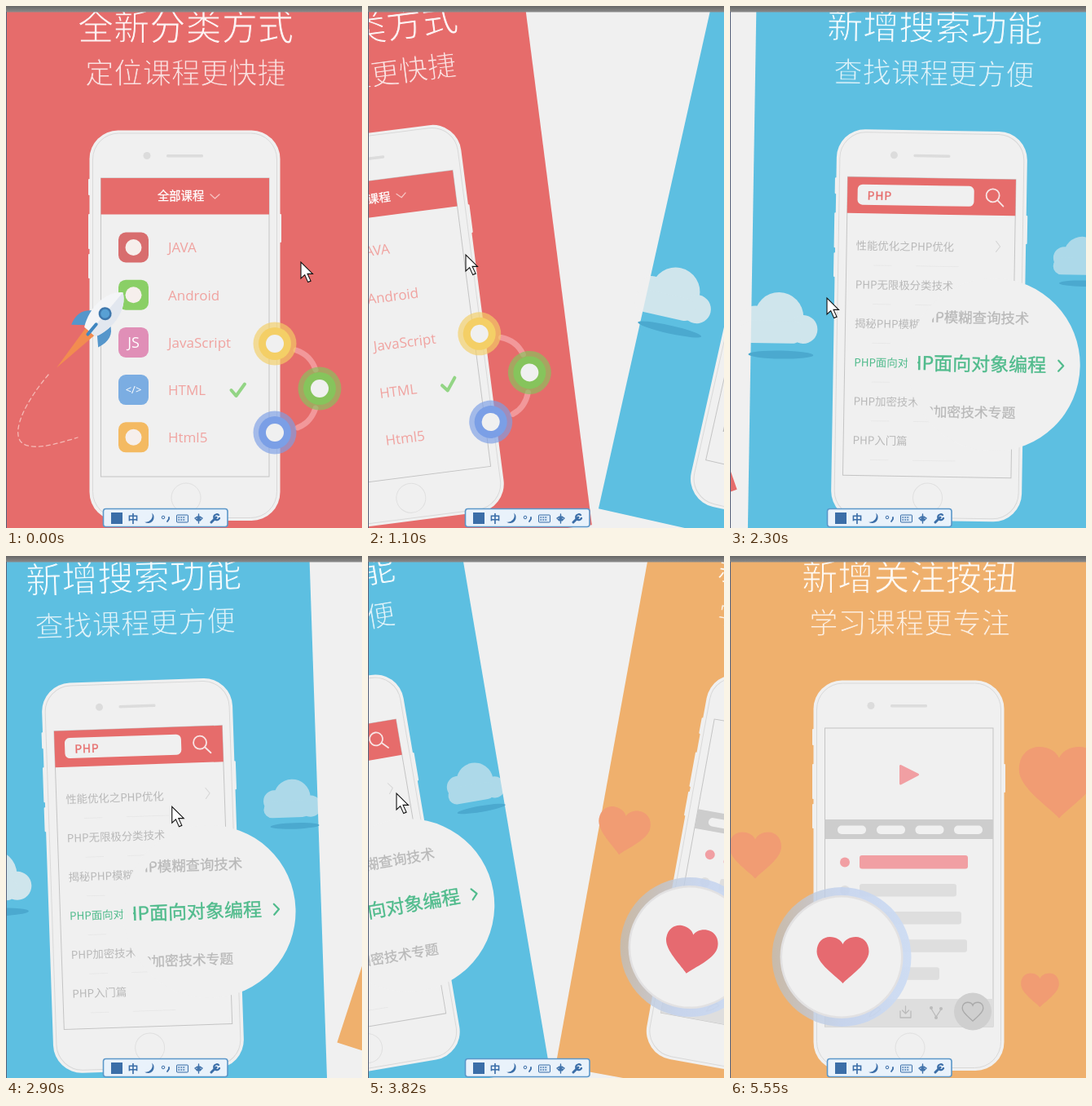
An HTML page that plays this animation: 437 by 640 pixels, repeating every 5.65 s.

```html
<!DOCTYPE html>
<html lang="zh">
<head>
<meta charset="utf-8">
<style>
html, body { margin: 0; width: 100%; height: 100%; overflow: hidden; background: #f0f0f0; }
svg { display: block; font-family: 'Noto Sans CJK SC', 'Noto Sans CJK', sans-serif; }
.latin { font-family: 'Open Sans', sans-serif; }
.line { fill: none; stroke-linecap: round; stroke-linejoin: round; }
</style>
</head>
<body>
<svg id="stage" width="437" height="640" viewBox="0 0 437 640"></svg>
<script>
const W = 437, LOOP = 5650, PALE = '#f0f0f0';
const RED = '#e66c6b', BLUE = '#5dbfe1', ORANGE = '#efb06d';

const rect = (x, y, w, h, fill, r = 0, extra = '') =>
  `<rect x="${x}" y="${y}" width="${w}" height="${h}" rx="${r}" fill="${fill}" ${extra}/>`;
const circle = (x, y, r, fill, extra = '') =>
  `<circle cx="${x}" cy="${y}" r="${r}" fill="${fill}" ${extra}/>`;
const path = (d, fill, extra = '') => `<path d="${d}" fill="${fill}" ${extra}/>`;
const line = (d, stroke, width = 1, extra = '') =>
  `<path class="line" d="${d}" stroke="${stroke}" stroke-width="${width}" ${extra}/>`;
// y is the vertical middle of the glyphs
const text = (x, y, size, str, fill, extra = '') =>
  `<text x="${x}" y="${y + size * .375}" font-size="${size}" fill="${fill}" ${extra}>${str}</text>`;
const heart = (x, y, scale, fill, extra = '') => path(
  'M0 29C-8 20-32 5-32-10C-32-22-24-28-16-28C-8-28-2-24 0-19C2-24 8-28 16-28C24-28 32-22 32-10C32 5 8 20 0 29Z',
  fill, `transform="translate(${x} ${y}) scale(${scale})" ${extra}`);

// a stroke in the page colour trims the glyphs to a light weight
const lightText = (y, size, str, opacity, backdrop, trim) =>
  text(220.5, y, size, str, '#fff', `text-anchor="middle" font-weight="300" fill-opacity="${opacity}"
    stroke="${backdrop}" stroke-width="${trim}"`);
const heading = (title, sub, backdrop) =>
  lightText(25, 44.2, title, .92, backdrop, 1) + lightText(82, 35.2, sub, .8, backdrop, .9);

const phone = () =>
  [[101, 212, 20], [101, 255, 43], [101, 304, 30], [334, 255, 35]]
    .map(([x, y, h]) => rect(x, y, 4, h, PALE, 1)).join('') +
  rect(102.5, 152.5, 234, 478.5, PALE, 35) +
  rect(106.5, 156, 226, 471.5, 'none', 32, 'stroke="#d9d9d9"') +
  circle(173, 183.5, 4.5, '#dcdcdc') + rect(197, 182, 45, 3.5, '#dcdcdc', 1.5) +
  circle(221, 603, 18, 'none', 'stroke="#e0e0e0"') +
  rect(116.5, 211, 206.5, 366, PALE, 0, 'stroke="#c4c4c4"');

const page = (fill, body) =>
  `<g class="page">${rect(1, -160, 436, 824, fill)}${body}</g>`;

function categories() {
  const rows = [['JAVA', '#d86d6e'], ['Android', '#8acf66'], ['JavaScript', '#e08fb7'],
    ['HTML', '#7bade2'], ['Html5', '#f4ba62']];
  const list = rows.map(([name, color], i) => {
    const y = 296 + i * 58.2;
    const glyph = i == 2 ? 'JS' : i == 3 ? '&lt;/&gt;' : '';
    return rect(138, y - 18.5, 37, 37, color, 9) +
      (glyph ? text(156.5, y, i == 2 ? 18 : 13, glyph, '#fff', 'class="latin" text-anchor="middle"')
             : circle(156.5, y, 10, '#f6efec')) +
      text(199, y, 17, name, '#f0a3a0', 'class="latin"');
  }).join('');
  const badges = [[330, 414, '#f4cf66'], [385, 469, '#86c45c'], [330, 523, '#7b9fe6']]
    .map(([x, y, c]) => circle(x, y, 26.5, c, 'opacity=".65"') + circle(x, y, 20, c) + circle(x, y, 11, PALE)).join('');
  const rocket = '<g transform="translate(121 378) rotate(40)">' +
    path('M-7 28H7L-3 88Z', '#f28c50') +
    path('M-13 5C-24 12-28 22-23 36L-8 24ZM13 5C24 12 26 22 20 36L8 24Z', '#5596cb') +
    path('M0-35C16-24 21 4 9 28H-9C-21 4-16-24 0-35Z', '#f4f5f7') +
    path('M0-35C16-24 21 4 9 28H0Z', '#e2e7ef') +
    circle(0, -1, 8, '#3f78ad') + circle(0, -1, 5.5, '#58a0d4') +
    rect(-2, 14, 4, 20, '#3f86c0', 2) + '</g>';
  return page(RED, heading('全新分类方式', '定位课程更快捷', RED) + phone() +
    rect(116.5, 211, 206.5, 44.5, RED) +
    text(186, 233, 14.3, '全部课程', '#fff', 'stroke="#fff" stroke-width=".3"') +
    line('M251 231l5.5 5 5.5-5', '#f7c4c2', 1.3) + list +
    line('M276.5 471l6 7 10.500-14.500', '#93d585', 4) +
    line('M52 452C25 484 7 519 18 534C30 547 62 537 88 529', '#f5b9b5', 1.3, 'stroke-dasharray="5 4"') +
    rocket + line('M356 422Q374 428 380 446M380 493Q374 511 358 517', '#f2989a', 7) + badges);
}

function cloud(x, y, scale, opacity) {
  return `<g transform="translate(${x} ${y}) scale(${scale})">` +
    '<ellipse cx="0" cy="49.500" rx="40" ry="5" fill="#4ba9cf"/>' +
    `<g opacity="${opacity}">` + circle(-3, 3, 30, PALE) + circle(27, 18, 17.5, PALE) +
    circle(-32, 8, 18, PALE) + rect(-50, 8, 77, 27.5, PALE, 14) + '</g></g>';
}

function search() {
  const grey = '#b8b8b8', green = '#50bb8c';
  const rows = ['性能优化之PHP优化', 'PHP无限极分类技术', '揭秘PHP模糊查询', 'PHP面向对象编程', 'PHP加密技术', 'PHP入门篇']
    .map((name, i) => text(128, 295 + i * 47.7, 13.4, name, i == 3 ? green : grey) +
      line(`M150 ${319 + i * 47.7}h22m30 0h52`, '#e8e8e8')).join('');
  const zoomed = [[342, 381, 17.4, 'PHP模糊查询技术', grey], [364, 437.6, 23, 'PHP面向对象编程', green], [327, 497, 16.8, 'PHP加密技术专题', grey]]
    .map(([x, y, size, name, fill]) =>
      text(x, y, size, name, fill, `text-anchor="end" stroke="${fill}" stroke-width="${size / 60}"`)).join('');
  return page(BLUE, cloud(38, 381, 1, .78) + cloud(408, 300, .75, .55) +
    heading('新增搜索功能', '查找课程更方便', BLUE) + phone() +
    rect(116.5, 211, 206.5, 44.5, RED) + rect(129, 220, 143, 25, PALE, 6) +
    text(141, 233.5, 14, 'PHP', RED, 'stroke="#e66c6b" stroke-width=".3" letter-spacing=".8"') +
    circle(295, 231, 8, 'none', 'stroke="#f8e5e5" stroke-width="1.8"') + line('M301 237l7 7', '#f8e5e5', 1.8) +
    rows + line('M300 287l5 6.5-5 6.5', '#d4d4d4') +
    circle(299.5, 438.5, 106, PALE) +
    '<clipPath id="lens"><circle cx="301" cy="438.5" r="95"/></clipPath>' +
    `<g clip-path="url(#lens)">${zoomed}</g>` +
    line('M379 432l6 6.5-6 6.5', green, 2.2));
}

function follow() {
  const pink = '#f19fa3', grey = '#dedede', ink = '#bbb';
  const bars = [119, 125, 132, 98].map((w, i) => rect(159, 402 + i * 34.1, w, 15.5, grey, 3)).join('');
  const pills = [132, 180, 227.5, 275].map(x => rect(x, 330.5, 35, 10.5, PALE, 5)).join('');
  return page(ORANGE, heart(31, 366.5, 1, '#f19c73') + heart(404, 277, 1.54, '#f19c73') +
    heart(380.5, 532, .73, '#f19c73') +
    heading('新增关注按钮', '学习课程更专注', ORANGE) + phone() +
    line('M209.5 257.5v21.5l21-11z', pink, 3, `style="fill:${pink}"`) +
    rect(116.5, 323, 206.5, 24, '#cdcdcd') + pills +
    circle(141, 375.5, 6, pink) + rect(159, 367, 133, 16.5, pink, 3) +
    circle(141, 410, 6, grey) + bars +
    rect(116.5, 543, 206.5, 34, grey) +
    line('M171 565l2-5 9-7 3 3-9 7zM209 558v8h13v-8M215.5 552v9m-4-4l4 4 4-4M247 555l6 10 6-9', ink, 1.3) +
    [[247, 554], [253, 566], [259, 555]].map(([x, y]) => circle(x, y, 2, ink)).join('') +
    circle(298, 558.5, 23, '#cfcfcf') +
    heart(298, 558.5, .4, 'none', 'stroke="#aaa" stroke-width="3.5"') +
    '<linearGradient id="ring"><stop offset="0" stop-color="#b4c0ca" stop-opacity=".65"/>' +
    '<stop offset=".5" stop-color="#c3d2ee" stop-opacity=".85"/><stop offset="1" stop-color="#cddcf3" stop-opacity=".95"/></linearGradient>' +
    circle(137, 491.5, 85.5, 'url(#ring)') + circle(137, 491.5, 75.5, '#e2e1e2') +
    circle(137, 491.5, 73, PALE) + heart(138.5, 495, 1, '#e66a70'));
}

function chrome() {
  const ink = '#3b6ea8';
  return rect(0, 0, W, 7.5, 'url(#bar)') +
    '<linearGradient id="bar" x2="0" y2="1"><stop stop-color="#666"/><stop offset="1" stop-color="#8a8a8a"/></linearGradient>' +
    rect(0, 7, 1, 633, '#56617a') +
    rect(119.5, 616.5, 152.5, 22, '#e9f2fb', 3, 'stroke="#5b97c9" stroke-width="1.6"') +
    rect(129, 621, 14, 14, ink) + text(149.5, 628, 13, '中', ink, 'font-weight="700"') +
    path('M179 621.5A8 8 0 0 1 170 632.5A7 7 0 1 0 179 621.5Z', ink) +
    circle(193, 627, 1.8, 'none', `stroke="${ink}"`) + line('M200 627v2l-2 3', ink, 1.8) +
    rect(209.5, 624, 14, 9, '#dbe9f7', 1, `stroke="${ink}"`) +
    line('M212 627h9M212 630h9', ink, 1.6, 'stroke-dasharray=".5 2.5"') +
    line('M236.5 623v11M232 628l3-2v5l-3-3M241 628l-3-2v5l3-3', ink, 1.4) +
    line('M252 633l6-6', ink, 3) + line('M261 624a3.5 3.5 0 1 0 1 4', ink, 2.2);
}

const stage = document.getElementById('stage');
stage.innerHTML = categories() + search() + follow() + chrome() +
  '<path id="cursor" d="M0 0V20l4.7-4.4 4 9 3.4-1.5-4-8.7H14.5Z" fill="#fff" stroke="#111" stroke-width="1.1"/>';
const pages = [...stage.querySelectorAll('.page')];
const cursor = document.getElementById('cursor');

// time, scroll position in pages, pointer x, pointer y
const keys = [
  [0, 0, 362, 314], [400, 0, 281, 311], [1100, .367, 120, 305], [1500, .49, 64, 315],
  [1600, .57, 64, 323], [1800, .74, 66, 340], [2000, .85, 75, 352], [2300, .953, 119, 358],
  [2600, 1, 230, 330], [2700, 1, 246, 315], [3320, 1.3, 115, 291], [4220, 1.63, -29, 291],
  [4420, 1.666, -45, 291], [4820, 1.9, -45, 291], [4920, 2, -45, 291], [LOOP, 2, -45, 291]];
const holds = [[4220, 4420], [4420, 4820], [4920, 5550]];

// the picture advances in steps of 100 ms, apart from the longer holds
function captureTime(t) {
  const hold = holds.find(([from, to]) => t >= from && t < to);
  if (hold) return hold[0];
  const shift = t >= 2920 ? 20 : 0;
  return Math.floor((t - shift) / 100) * 100 + shift;
}

function sample(t) {
  const i = keys.findIndex(k => k[0] > t), a = keys[i - 1], b = keys[i];
  const u = (t - a[0]) / (b[0] - a[0]);
  return a.map((v, j) => v + (b[j] - v) * u);
}

function draw(now) {
  const [, scroll, x, y] = sample(captureTime(now % LOOP));
  pages.forEach((el, i) => {
    const d = i - scroll;
    el.style.display = Math.abs(d) < 1.2 ? '' : 'none';
    el.setAttribute('transform', `translate(${W * d} 0) rotate(${20 * d} 219 664)`);
  });
  cursor.setAttribute('transform', `translate(${x} ${y})`);
}

const start = performance.now();
function tick() {
  draw(performance.now() - start);
  requestAnimationFrame(tick);
}
tick();
</script>
</body>
</html>
```
